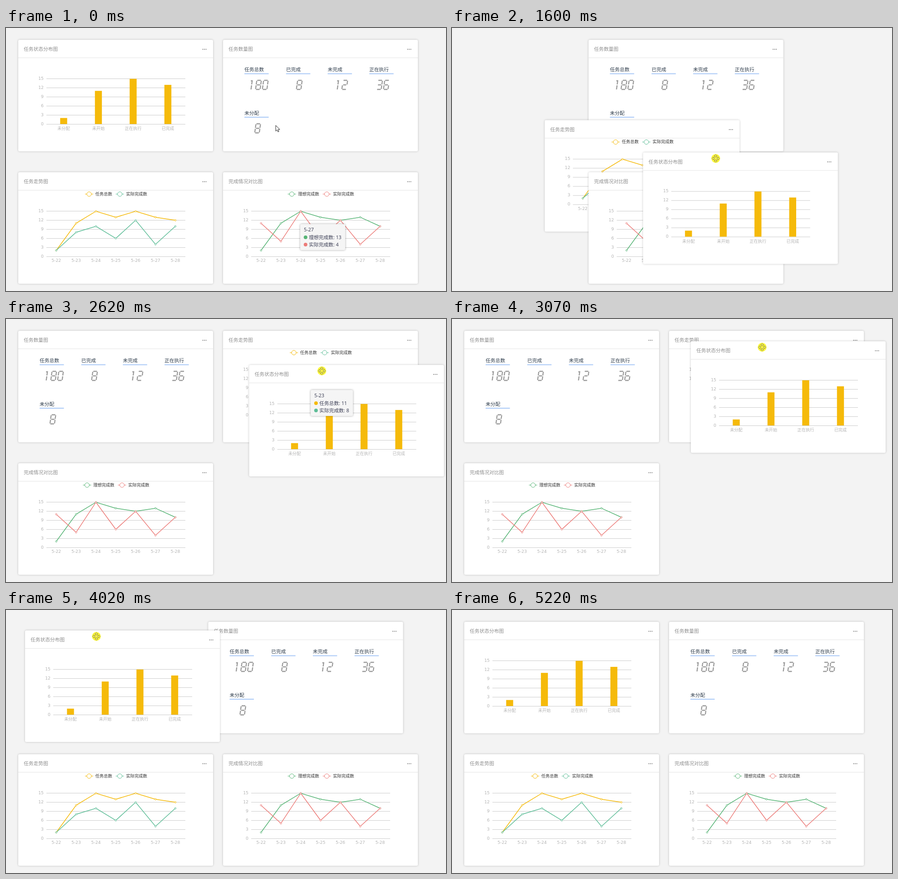
Write an HTML page that moves like this. It is 969 by 578 pixels and loops after 6.14 s.

```html
<!DOCTYPE html>
<html lang="zh-CN">
<head>
<meta charset="utf-8">
<title>任务看板</title>
<style>
html, body { margin: 0; width: 100%; height: 100%; overflow: hidden; background: #f3f3f3; }
svg { display: block; }
text { font-family: "DejaVu Sans", "Noto Sans CJK SC", "Noto Sans CJK", sans-serif; font-size: 9.25px; }
.panel { fill: #fff; filter: drop-shadow(0 0 2px rgba(0,0,0,.22)); }
.title { font-size: 10.75px; fill: #8f8f8f; }
.rule { stroke: #e4e4e4; }
.grid { stroke: #ccc; }
.axis { fill: #b4b4b4; }
.legend { fill: #333; }
.label { font-size: 10.75px; fill: #2f3d4c; }
.digits { fill: none; stroke: #9c9c9c; stroke-width: 2.4; }
.tip rect { fill: #f5f5f5; filter: drop-shadow(0 0 2px rgba(0,0,0,.35)); }
.tip text { font: 10.75px "Noto Sans", "Noto Sans CJK SC", "Noto Sans CJK", sans-serif; fill: #3f4258; }
</style>
</head>
<body>
<svg id="stage" width="969" height="578" viewBox="0 0 969 578"></svg>
<script>
const LOOP = 6140;
const YELLOW = '#f5ba0a', TEAL = '#5dbd97', GREEN = '#56b475', RED = '#ec7b78';

// ---- drawing helpers ----
const line = (x1, y1, x2, y2, attrs = '') => `<path d="M${x1} ${y1}L${x2} ${y2}" ${attrs}/>`;
const circle = (x, y, r, attrs = '') => `<circle cx="${x}" cy="${y}" r="${r}" ${attrs}/>`;
const label = (x, y, str, cls = '', anchor = 'start') =>
  `<text x="${x}" y="${y}" class="${cls}" text-anchor="${anchor}">${str}</text>`;
const each = (list, draw) => [...list].map(draw).join('');
const valueY = v => 185 - v * 6.62;

function card(id, title, body) {
  const dots = each([-1, 0, 1], i => circle(410 + 3.5 * i, 20.7, 1.05, 'fill="#777"'));
  return `<g id="${id}"><rect class="panel" width="429" height="245" rx="3"/>` +
    line(0, 39.5, 429, 39.5, 'class="rule"') + label(12, 24, title, 'title') + dots + body + '</g>';
}

function grid() {
  let out = '';
  for (let v = 0; v <= 15; v += 3) {
    const y = Math.floor(valueY(v)) + .5;
    out += line(62, y, 368, y, 'class="grid"') + label(56, y + 2.4, v, 'axis', 'end');
  }
  return out;
}

function bars(data) {
  return grid() + each(Object.entries(data), ([name, v], i) => {
    const x = 100 + 76.5 * i, y = valueY(v);
    return `<rect x="${x - 7.7}" y="${y}" width="15.4" height="${185 - y}" fill="${YELLOW}"/>` +
      label(x, 198, name, 'axis', 'middle');
  });
}

function lines(series) {
  const px = i => 83.7 + 43.7 * i;
  const days = each(Array(7).keys(), i => label(px(i), 197.2, `5-${22 + i}`, 'axis', 'middle'));
  return grid() + days + each(series, ({ name, color, at, values }) => {
    const pts = values.map((v, i) => [px(i), valueY(v)]);
    return `<polyline points="${pts.join(' ')}" fill="none" stroke="${color}" stroke-width="1.5"/>` +
      `<g fill="#fff" stroke="${color}">${each(pts, ([x, y]) => circle(x, y, 1.7))}` +
      line(at - 9, 48, at + 9, 48) + circle(at, 48, 5) + '</g>' + label(at + 13.7, 50.6, name, 'legend');
  });
}

// Segments a..g of a 12 x 22 digit; i is the narrow "1"
const SEGMENTS = {
  a: 'M2 1H10', b: 'M11 2V10', c: 'M11 12V20', d: 'M2 21H10',
  e: 'M1 12V20', f: 'M1 2V10', g: 'M2.5 11H9.5', i: 'M3 2H6V10M6 12V21'
};
const SHAPES = { 0: 'abcdef', 1: 'i', 2: 'abged', 3: 'abgcd', 6: 'afgedc', 8: 'abcdefg' };

function counter([name, value], i) {
  const x = 47 + 91.7 * (i % 4), y = 69 + 95.5 * (i >> 2);
  const start = x + 31.3 - 6.6 * value.length;
  return label(x, y, name, 'label') +
    `<rect x="${x}" y="${y + 4.5}" width="53.5" height="2" fill="#aac9f7"/>` +
    each(value, (ch, k) => `<path class="digits" transform="matrix(1 0 -.14 1 ${start + 15 * k} ${y + 19})"
      d="${each(SHAPES[ch], s => SEGMENTS[s])}"/>`);
}

function tip(id, x, y, w, day, rows) {
  return `<g id="${id}" class="tip" transform="translate(${x} ${y})"><rect width="${w}" height="57" rx="3"/>` +
    label(8, 16.3, day) + each(rows, ([color, str], i) =>
      circle(11.7, 29 + 16 * i, 4, `fill="${color}"`) + label(19, 32.8 + 16 * i, str)) + '</g>';
}

const counts = { 任务总数: '180', 已完成: '8', 未完成: '12', 正在执行: '36', 未分配: '8' };
const arms = each([0, 90, 180, 270], a =>
  `<path d="M-1.3 -2V-5H-3.3L0 -8.4L3.3 -5H1.3V-2" transform="rotate(${a})"/>`);

document.getElementById('stage').innerHTML =
  card('count', '任务数量图', each(Object.entries(counts), counter)) +
  card('trend', '任务走势图', lines([
    { name: '任务总数', color: YELLOW, at: 156, values: [2, 11, 15, 13, 15, 13, 12] },
    { name: '实际完成数', color: TEAL, at: 223.7, values: [2, 8, 10, 6, 12, 4, 10] }])) +
  card('compare', '完成情况对比图', lines([
    { name: '理想完成数', color: GREEN, at: 151.5, values: [2, 11, 15, 13, 12, 13, 10] },
    { name: '实际完成数', color: RED, at: 228.5, values: [11, 5, 15, 6, 12, 4, 10] }])) +
  card('status', '任务状态分布图', bars({ 未分配: 2, 未开始: 11, 正在执行: 15, 已完成: 13 })) +
  tip('tipCompare', 648, 431, 99, '5-27', [[GREEN, '理想完成数: 13'], [RED, '实际完成数: 4']]) +
  tip('tipTrend', 671, 156, 93, '5-23', [[YELLOW, '任务总数: 11'], [TEAL, '实际完成数: 8']]) +
  `<g id="mover">${circle(0, 0, 9.7, 'id="press" fill="#fcf73e"')}
    <g fill="#fff" fill-opacity=".25" stroke="#6b6526" stroke-width=".8">${arms}</g></g>
  <path id="arrow" d="M0 0V12.6L2.9 9.9L4.9 14.3L7 13.4L5.1 9.1H9.1Z" fill="#fff" stroke="#222"/>`;

// ---- motion ----
const GRAB = 960, REGRAB = 2820, DROP = 4510, LEAVE = 4650, GONE = 5170;

// Pointer way points: time, x, y
const route = [
  [60, 594, 214], [740, 188, 39], [GRAB, 187, 39],
  [1216, 350, 110.5], [1530, 562, 276], [1996, 677.5, 341], [2200, 677.5, 341],
  [2620, 695.5, 114], [2800, 701, 81], [3088, 683, 62], [3400, 659, 54],
  [4024, 199, 58], [4100, 196, 55], [LEAVE, 196, 55], [GONE, 883, 572]
];

const mix = (a, b, p) => a.map((v, k) => v + (b[k] - v) * p);
const clamp = p => Math.min(1, Math.max(0, p));
const slot = i => [27 + 451 * (i % 2), 26 + 291 * (i >> 1)];
const slide = (t, start, span = 300) => 1 - (1 - clamp((t - start) / span)) ** 3;

function pointerAt(t) {
  const n = route.findIndex(k => k[0] > t);
  const [t1, ...b] = route.at(n), [t0, ...a] = route[Math.max(0, n < 0 ? route.length - 1 : n - 1)];
  return t1 === t0 ? b : mix(a, b, (t - t0) / (t1 - t0));
}

function draggedAt(t) {
  if (t < GRAB) return slot(0);
  const [x, y] = pointerAt(Math.min(t, DROP));
  return mix([x - (t < REGRAB ? 160 : 157), y - 13], slot(0), slide(t, DROP - 20, 200));
}

// The others move up one slot, then return home
const neighbourAt = (home, back, t) =>
  mix(mix(slot(home), slot(home - 1), slide(t, 1560)), slot(home), slide(t, back));

const el = id => document.getElementById(id);
const place = (id, [x, y]) => el(id).setAttribute('transform', `translate(${x.toFixed(1)} ${y.toFixed(1)})`);
const show = (id, on) => el(id).setAttribute('visibility', on ? 'visible' : 'hidden');

function render(now) {
  // The picture refreshes in even steps
  const t = Math.max(0, Math.floor((now - 28) / 78) * 78 + 46);

  place('status', draggedAt(t));
  place('count', neighbourAt(1, 3849, t));
  place('trend', neighbourAt(2, 3163, t));
  place('compare', neighbourAt(3, 3163, t));

  const pointer = pointerAt(t), overHeader = t > 600 && t < LEAVE;
  place('mover', pointer);
  place('arrow', pointer);
  show('mover', overHeader);
  // Plain visibility would override the hidden parent
  el('press').setAttribute('opacity', t > 810 && t < 4320 ? 1 : 0);
  show('arrow', !overHeader && t < GONE);

  show('tipCompare', t < 140);
  show('tipTrend', t > 2460 && t < 2920);
}

function frame() {
  render(performance.now() % LOOP);
  requestAnimationFrame(frame);
}
frame();
</script>
</body>
</html>
```
